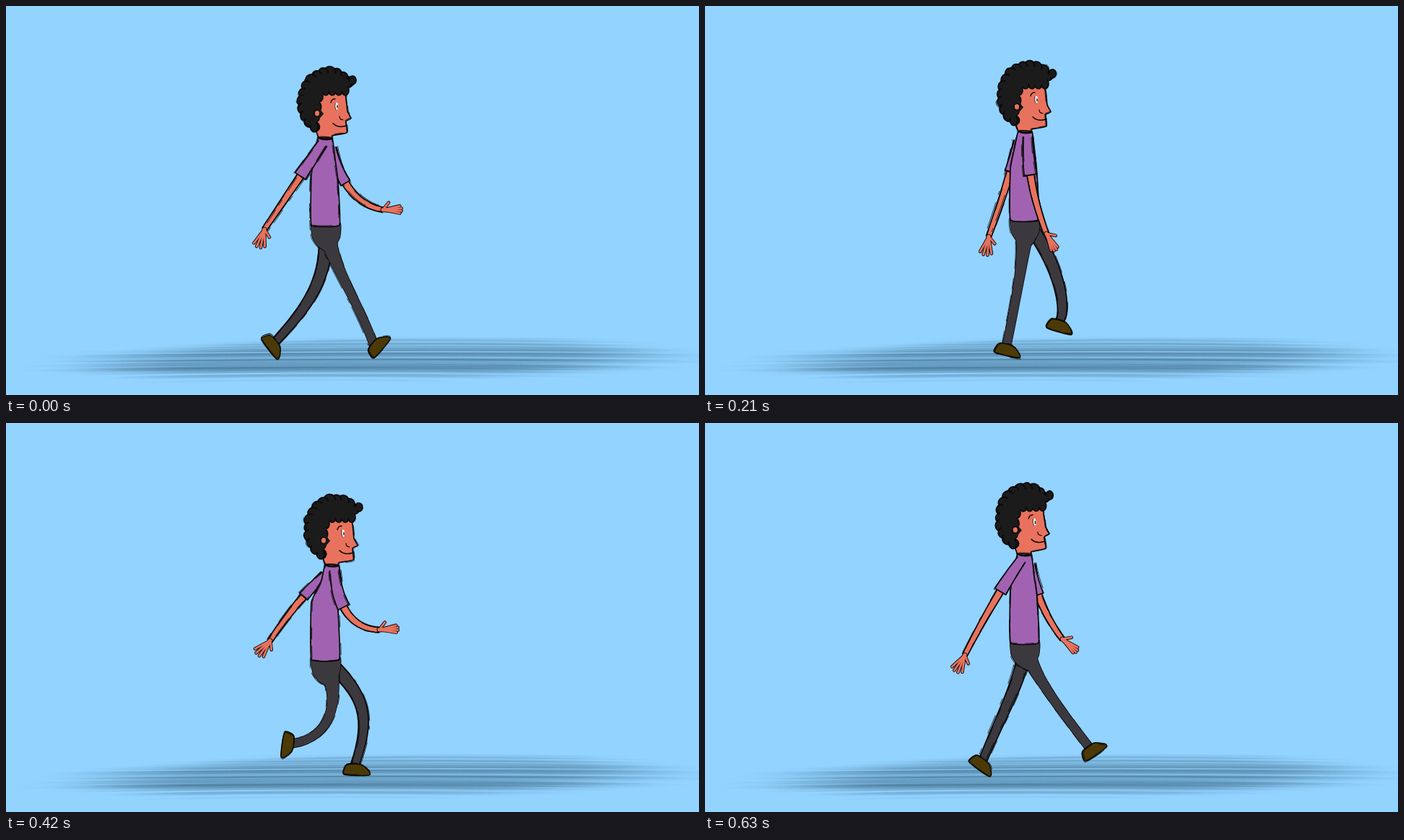
Recreate the animation shown at these times as an HTML page with a canvas. Size 960 by 540 pixels, loop 700 ms.

```html
<!DOCTYPE html>
<html lang="en">
<head>
<meta charset="utf-8">
<title>Walk cycle</title>
<style>
  html, body { margin: 0; width: 100%; height: 100%; overflow: hidden; background: #93d3ff; }
  canvas { display: block; }
</style>
</head>
<body>
<canvas id="stage" width="960" height="540"></canvas>
<script>
const ctx = document.getElementById('stage').getContext('2d');
const SKY = '#93d3ff', SKIN = '#e8725d', SHIRT = '#a163b1', PANTS = '#3c393e',
  SHOE = '#4b3a06', HAIR = '#1b1b1b', INK = '#0b0909';
const STEP = 70, HIP = 443, RAD = Math.PI / 180;

// leg: two curve handles and the ankle; arm: one handle and the wrist; toe and hand: degrees
const limbs = (leg, toe, arm, hand) => ({ leg, toe, arm, hand });
const contact = {
  neck: [442, 183], hem: 304, tilt: 0,
  front: limbs([[446, 350], [488, 410], [509, 469]], -50, [[468, 272], [522, 283]], -1),
  back: limbs([[446, 375], [425, 410], [373, 466]], 51, [[400, 248], [358, 310]], 108)
};
const down = {
  neck: [451, 197], hem: 328, tilt: 0,
  front: limbs([[490, 372], [510, 400], [483, 475]], 0, [[462, 285], [517, 287]], -3),
  back: limbs([[460, 372], [460, 435], [397, 445]], 97, [[404, 245], [366, 302]], 132)
};
const passing = {
  neck: [444, 176], hem: 298, tilt: 4,
  front: limbs([[444, 340], [441, 420], [445, 474]], 0, [[424, 250], [438, 328]], 72),
  back: limbs([[466, 348], [512, 409], [440, 441]], 97, [[424, 250], [438, 328]], 72)
};
const rise = {
  neck: [443, 174], hem: 297, tilt: 0,
  front: limbs([[484, 345], [504, 416], [491, 438]], 15, [[447, 250], [473, 316]], 62),
  back: limbs([[444, 345], [428, 420], [418, 471]], 12, [[424, 235], [393, 320]], 100)
};
const reach = {
  neck: [442, 182], hem: 305, tilt: -2,
  front: limbs([[448, 340], [490, 395], [532, 450]], -35, [[459, 252], [495, 300]], 40),
  back: limbs([[442, 350], [415, 395], [385, 468]], 35, [[416, 240], [379, 318]], 108)
};
const wideReach = { ...reach, back: { ...reach.back, arm: [[402, 240], [360, 322]], hand: 118 } };
const half = [contact, down, passing, rise];
const poses = [...half, reach, ...half, wideReach];

let seed = 1;
function rand(lo, hi) {
  seed = (seed * 16807) % 2147483647;
  return lo + (hi - lo) * seed / 2147483647;
}

function bezier(pts, t) {
  if (pts.length === 1) return pts[0];
  const next = pts.slice(1).map(([x, y], i) => [pts[i][0] + (x - pts[i][0]) * t, pts[i][1] + (y - pts[i][1]) * t]);
  return bezier(next, t);
}

// Firm outline, then loose broken sketch lines
function ink(path, fill, rough = 2) {
  ctx.fillStyle = fill;
  ctx.fill(path);
  ctx.strokeStyle = INK;
  ctx.lineWidth = 1.7;
  ctx.stroke(path);
  for (let i = 0; i < rough; i++) {
    ctx.save();
    ctx.translate(rand(-1.8, 1.8), rand(-1.5, 1.5));
    ctx.setLineDash([rand(14, 40), rand(6, 20), rand(4, 18), rand(10, 30)]);
    ctx.lineWidth = .8;
    ctx.stroke(path);
    ctx.restore();
  }
}

// Closed outline with softened corners
function shape(pts, fill, soft = .08) {
  const path = new Path2D(), n = pts.length;
  path.moveTo(...pts[0]);
  pts.forEach((b, i) => {
    const a = pts[(i + n - 1) % n], c = pts[(i + 1) % n], d = pts[(i + 2) % n];
    path.bezierCurveTo(b[0] + (c[0] - a[0]) * soft, b[1] + (c[1] - a[1]) * soft,
      c[0] - (d[0] - b[0]) * soft, c[1] - (d[1] - b[1]) * soft, ...c);
  });
  ink(path, fill);
  return path;
}

// Tapered tube along the curve from its start to t = end, open at the start
function tube(curve, end, width, fill) {
  const left = [], right = [], n = 18;
  for (let i = 0; i <= n; i++) {
    const t = end * i / n, [x, y] = bezier(curve, t);
    const a = bezier(curve, t - .01), b = bezier(curve, t + .01);
    const dx = b[0] - a[0], dy = b[1] - a[1], k = width(t) / Math.hypot(dx, dy);
    left.push([x + dy * k, y - dx * k]);
    right.unshift([x - dy * k, y + dx * k]);
  }
  const path = new Path2D();
  [...left, ...right].forEach(p => path.lineTo(...p));
  ink(path, fill);
  return path;
}

function line(pts, width, color = INK) {
  ctx.beginPath();
  ctx.moveTo(...pts[0]);
  if (pts.length > 2) ctx.quadraticCurveTo(...pts[1], ...pts[2]);
  else ctx.lineTo(...pts[1]);
  ctx.lineWidth = width;
  ctx.strokeStyle = color;
  ctx.stroke();
}

function drawHand([x, y], deg) {
  const spread = deg > 90 ? 13 : 8;
  const rays = [-1.5, -.5, .5, 1.5].map(f => [deg + f * spread, 27 - 2 * Math.abs(f), 2.8]);
  rays.push([deg - 50, 13, 2.8], [deg, 9, 5]);
  for (const [edge, color] of [[1.8, INK], [0, SKIN]])
    for (const [a, r, w] of rays)
      line([[x, y], [x + r * Math.cos(a * RAD), y + r * Math.sin(a * RAD)]], w + edge, color);
}

function drawArm({ arm, hand }, [nx, ny], near, ahead) {
  const shoulder = [nx + (ahead ? 1 : -1) * (near ? 4 : 10), ny + (near ? 8 : 14)];
  const curve = [shoulder, ...arm], wide = near ? 6.5 : 5;
  tube(curve, 1, t => 6 - 2.4 * t, SKIN);
  drawHand(arm[1], hand);
  tube(curve, .39, t => wide + 6 * t, SHIRT);
}

function drawLeg({ leg, toe }, hem, near) {
  const curve = [[HIP, hem], ...leg];
  if (near) {
    const hips = shape([[HIP - 19, hem - 4], [HIP + 19, hem - 4], [HIP + 19, hem + 18],
      [HIP + 6, hem + 38], [HIP - 10, hem + 30], [HIP - 18, hem + 18]], PANTS);
    const thigh = tube(curve, 1, t => 5.7 + 11 * (1 - t) ** 4, PANTS);
    ctx.fill(hips);
    ctx.fill(thigh);
  } else tube(curve, 1, t => 5.7 + 4 * (1 - t), PANTS);
  ctx.save();
  ctx.translate(...leg[2]);
  ctx.rotate(toe * RAD);
  ctx.scale(.9, .9);
  shape([[-17, 14], [-13, 0], [0, -2], [12, 0], [22, 9], [23, 15], [5, 16]], SHOE, .12);
  ctx.restore();
}

function drawTorso([nx, ny], hem) {
  shape([[nx - 9, ny], [nx + 10, ny + 1], [nx + 14, ny + 30], [HIP + 17, ny + 60], [HIP + 19, hem],
    [HIP - 20, hem], [HIP - 20, ny + 52], [nx - 14, ny + 22]], SHIRT, .05);
  line([[nx - 9, ny], [nx, ny + 4], [nx + 10, ny + 1]], 2.6);
}

function disc(x, y, rx, ry, fill, rough) {
  const path = new Path2D();
  path.ellipse(x, y, rx, ry, 0, 0, 7);
  ink(path, fill, rough);
}

function drawHair() {
  const curls = 14;
  for (let i = 0; i < curls; i++) {
    const a = (-42 - 196 * i / (curls - 1)) * RAD, r = rand(6.5, 8.5);
    disc(447 + 36 * Math.cos(a), 133 + 41 * Math.sin(a), r, r, HAIR, 1);
  }
  disc(480, 103, 5, 6, HAIR, 1);
  for (let x = 443; x < 474; x += 9) disc(x, 117, 5, 7, HAIR, 0);
  for (let y = 126; y < 170; y += 14) disc(434 - (y - 126) / 6, y, 5, 7, HAIR, 0);
  ctx.beginPath();
  ctx.ellipse(449, 135, 27, 30, 0, -232 * RAD, -42 * RAD);
  ctx.lineCap = 'butt';
  ctx.lineWidth = 24;
  ctx.strokeStyle = HAIR;
  ctx.stroke();
  ctx.lineCap = 'round';
}

function drawHead([nx, ny], tilt) {
  ctx.save();
  ctx.translate(nx, ny);
  ctx.rotate(tilt * RAD);
  ctx.translate(-442, -183);
  shape([[438, 120], [469, 120], [473, 146], [478, 156], [471, 160], [472, 176],
    [452, 180], [451, 190], [435, 188], [424, 150]], SKIN);
  drawHair();
  disc(431, 149, 4, 4.5, SKIN, 0);
  ctx.beginPath();
  ctx.ellipse(458, 139, 2.2, 5, 0, 0, 7);
  ctx.fillStyle = '#fff';
  ctx.fill();
  line([[456, 135], [455, 140], [457, 144]], .8);
  line([[459, 138], [459, 141]], 1.4);
  line([[450, 134], [451, 129], [456, 129]], 1.4);
  line([[462, 153], [462, 158], [467, 158]], 1.2);
  line([[453, 163], [460, 170], [472, 166]], 1.6);
  ctx.restore();
}

// Soft brushed shadow: long strokes, densest in the middle of the band
function paintGround() {
  const layer = document.createElement('canvas');
  layer.width = 960;
  layer.height = 540;
  const g = layer.getContext('2d');
  for (let i = 0; i < 180; i++) {
    const v = (rand(0, 1) + rand(0, 1)) / 2, y = 459 + 65 * v;
    const mid = 600 - 190 * v + rand(-50, 50), reach = (250 + 230 * Math.sin(Math.PI * v)) * rand(.75, 1);
    const a = mid - reach, b = mid + reach;
    const fade = g.createLinearGradient(a, 0, b, 0);
    [0, 1, 1, 0].forEach((on, j) => fade.addColorStop([0, .2, .8, 1][j], `rgba(45,85,112,${on * .065})`));
    g.strokeStyle = fade;
    g.lineWidth = rand(.7, 3.2);
    g.beginPath();
    g.moveTo(a, y + 2);
    g.bezierCurveTo(a + reach * .7, y - 2, a + reach * 1.2, y - 3, b, y + rand(-1, 3));
    g.stroke();
  }
  return layer;
}

const ground = paintGround();
ctx.lineCap = ctx.lineJoin = 'round';

function draw(k) {
  const { neck, hem, tilt, front, back } = poses[k];
  const lead = k < 3 || k > 6; // near leg ahead, near arm behind
  const [ahead, behind] = lead ? [front, back] : [back, front];
  seed = 977 * (k + 1);
  ctx.fillStyle = SKY;
  ctx.fillRect(0, 0, 960, 540);
  ctx.drawImage(ground, 0, 0);
  drawArm(ahead, neck, false, lead);
  drawLeg(behind, hem, false);
  drawLeg(ahead, hem, true);
  drawHead(neck, tilt);
  drawTorso(neck, hem);
  drawArm(behind, neck, true, !lead);
}

let start;
function tick(now) {
  start ??= now;
  draw(Math.floor((now - start) / STEP) % poses.length);
  requestAnimationFrame(tick);
}
draw(0);
requestAnimationFrame(tick);
</script>
</body>
</html>
```
